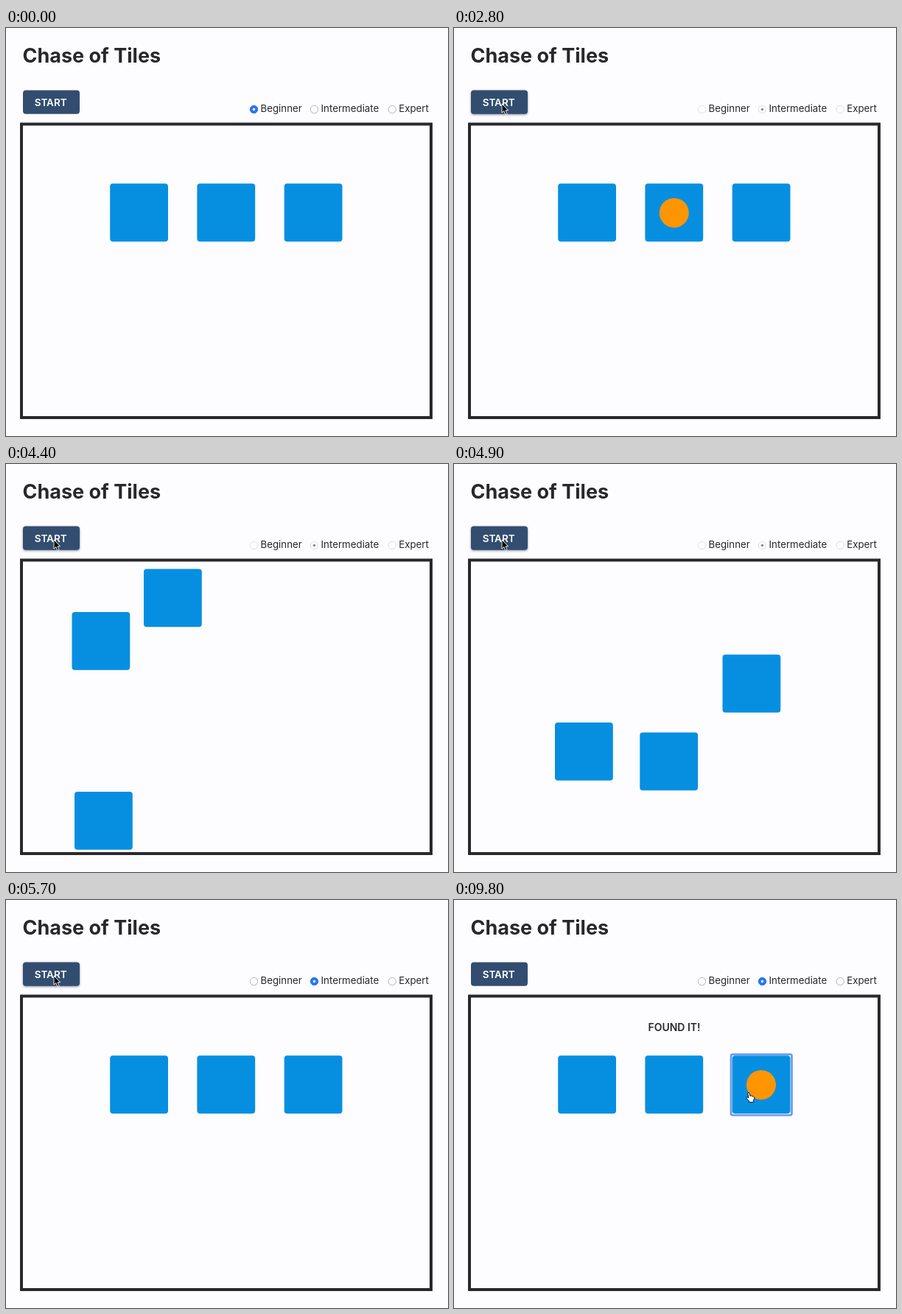
Write an HTML page that moves like this. It is 600 px wide and 554 px high and loops after 10000 ms.

```html
<!DOCTYPE html>
<html lang="en">
<head>
<meta charset="utf-8">
<title>Chase of Tiles</title>
<style>
  html, body { margin: 0; width: 100%; height: 100%; overflow: hidden; background: #fdfcfe; }
  svg { display: block; }
  text { font-family: Inter, Roboto, sans-serif; fill: #28272b; }
  .title { font-size: 27px; font-weight: 700; }
  .label { font-size: 13.3px; }
  .start { font-size: 13.5px; font-weight: 600; fill: #fff; }
  #message { font-size: 14px; font-weight: 600; text-anchor: middle; }
  #button { fill: #324d70; }
  #button.hover { filter: drop-shadow(0 1px 1.5px rgba(20, 30, 60, .5)); }
  .shell { fill: #068fe1; }
  .radio circle:first-child { fill: #fff; stroke: #b4b3b7; }
  .radio circle:last-child { fill: none; }
  .radio.on circle:first-child { fill: #2878f0; stroke: #2472e8; }
  .radio.on circle:last-child { fill: #fff; }
  .disabled .radio circle:first-child { fill: #fff; stroke: #dddce0; }
  .disabled .radio.on circle:last-child { fill: #89888c; }
</style>
</head>
<body>
<svg width="600" height="554" viewBox="0 0 600 554">
  <text class="title" x="22.5" y="46.5">Chase of Tiles</text>
  <rect id="button" x="23" y="84.5" width="77" height="32.3" rx="4"/>
  <text class="start" x="38.7" y="105.7">START</text>
  <g id="levels"></g>
  <rect x="21" y="130.5" width="556" height="398.5" fill="none" stroke="#29282c" stroke-width="4"/>
  <text id="message" x="299" y="178"></text>
  <g id="shells"></g>
  <rect id="ring" y="209.7" width="82.4" height="82.4" rx="2" fill="none" stroke="#6c9eee" stroke-width="2.8"/>
  <circle id="ball" cy="251" r="20" fill="#ff9500"/>
  <g id="cursor">
    <path id="arrow" d="M0 0V12L2.8 9.5L5 14.5L7.1 13.6L5 8.8H8.7Z" fill="#000" stroke="#fff" stroke-width=".9"/>
    <path id="hand" d="M-1.2.6Q0-.8 1.1.6L2 4.8L3.3 4L4.6 5L5.8 4.7L6.6 5.8Q8 6 7.7 8L6.4 11V13.2H.6V11.6L-3.4 7.5Q-3.6 5.8-1.9 6.2L-.1 7.4Z"
      fill="#fff" stroke="#000" stroke-width=".9"/>
  </g>
</svg>
<script>
const $ = id => document.getElementById(id);
const LOOP = 10000, STEP = 100, HOME_Y = 211.3, SIZE = 78.8;
const homes = [141.2, 259.4, 377.7];

$('levels').innerHTML = [[336.5, 'Beginner'], [418.5, 'Intermediate'], [524.2, 'Expert']]
  .map(([x, name]) => `<g class="radio"><circle cx="${x}" cy="110.5" r="5.2"/>
    <circle cx="${x}" cy="110.5" r="1.7"/></g><text class="label" x="${x + 9}" y="113.7">${name}</text>`).join('');
$('shells').innerHTML = homes
  .map(() => `<rect class="shell" width="${SIZE}" height="${SIZE}" rx="4"/>`).join('');

const radios = document.querySelectorAll('.radio');
const shells = document.querySelectorAll('.shell');

// Each shell rests at a new spot every half second, then returns to the row.
const shuffle = (from, to, ...stops) =>
  [[homes[from], HOME_Y], ...stops, [homes[to], HOME_Y]].map((p, i) => [3400 + i * 500, ...p]);
const shellPaths = [
  shuffle(0, 1, [257, 231], [187, 142.5], [252.3, 364.4]),
  shuffle(1, 2, [102, 394], [93, 445], [364.5, 258.8]),
  shuffle(2, 0, [70, 283], [89.5, 201], [137, 351])
];
const cursorPath = [
  [100, 449, 475], [500, 418, 108], [700, 418, 108], [1100, 79, 103], [1200, 65, 103],
  [5700, 65, 103], [6200, 230, 308], [6500, 300, 264], [7000, 300, 264], [7800, 400, 261.5]
];

function along(path, t) {
  if (t <= path[0][0]) return path[0].slice(1);
  const i = path.findIndex(key => key[0] > t);
  if (i < 0) return path[path.length - 1].slice(1);
  const [t0, x0, y0] = path[i - 1], [t1, x1, y1] = path[i];
  const p = (1 - Math.cos(Math.PI * (t - t0) / (t1 - t0))) / 2;
  return [x0 + (x1 - x0) * p, y0 + (y1 - y0) * p];
}

const between = (t, start, end) => t >= start && t < end;
const show = (id, visible) => $(id).style.display = visible ? '' : 'none';

function draw(t) {
  shells.forEach((shell, i) => {
    const [x, y] = along(shellPaths[i], t);
    shell.setAttribute('x', x);
    shell.setAttribute('y', y);
  });

  const level = t < 600 ? 0 : 1;
  radios.forEach((radio, i) => radio.classList.toggle('on', i === level));
  $('levels').classList.toggle('disabled', between(t, 2000, 5400));
  $('button').classList.toggle('hover', between(t, 1200, 5800));

  const found = t >= 8000;
  show('ball', between(t, 2000, 3000) || found);
  $('ball').setAttribute('cx', found ? 417 : 298.8);
  show('ring', t >= 6600);
  $('ring').setAttribute('x', homes[found ? 2 : 1] - 1.6);
  $('message').textContent = t < 6700 ? '' : t < 8100 ? 'GUESS AGAIN!' : 'FOUND IT!';

  const [x, y] = along(cursorPath, t);
  const overShell = between(y, HOME_Y, HOME_Y + SIZE) && homes.some(h => between(x, h, h + SIZE));
  show('cursor', t >= 100);
  show('hand', overShell);
  show('arrow', !overShell);
  $('cursor').setAttribute('transform', `translate(${x} ${y})`);
}

const begin = performance.now();
function tick() {
  const elapsed = (performance.now() - begin) % LOOP;
  draw(Math.floor(elapsed / STEP) * STEP);
  requestAnimationFrame(tick);
}
tick();
</script>
</body>
</html>
```
